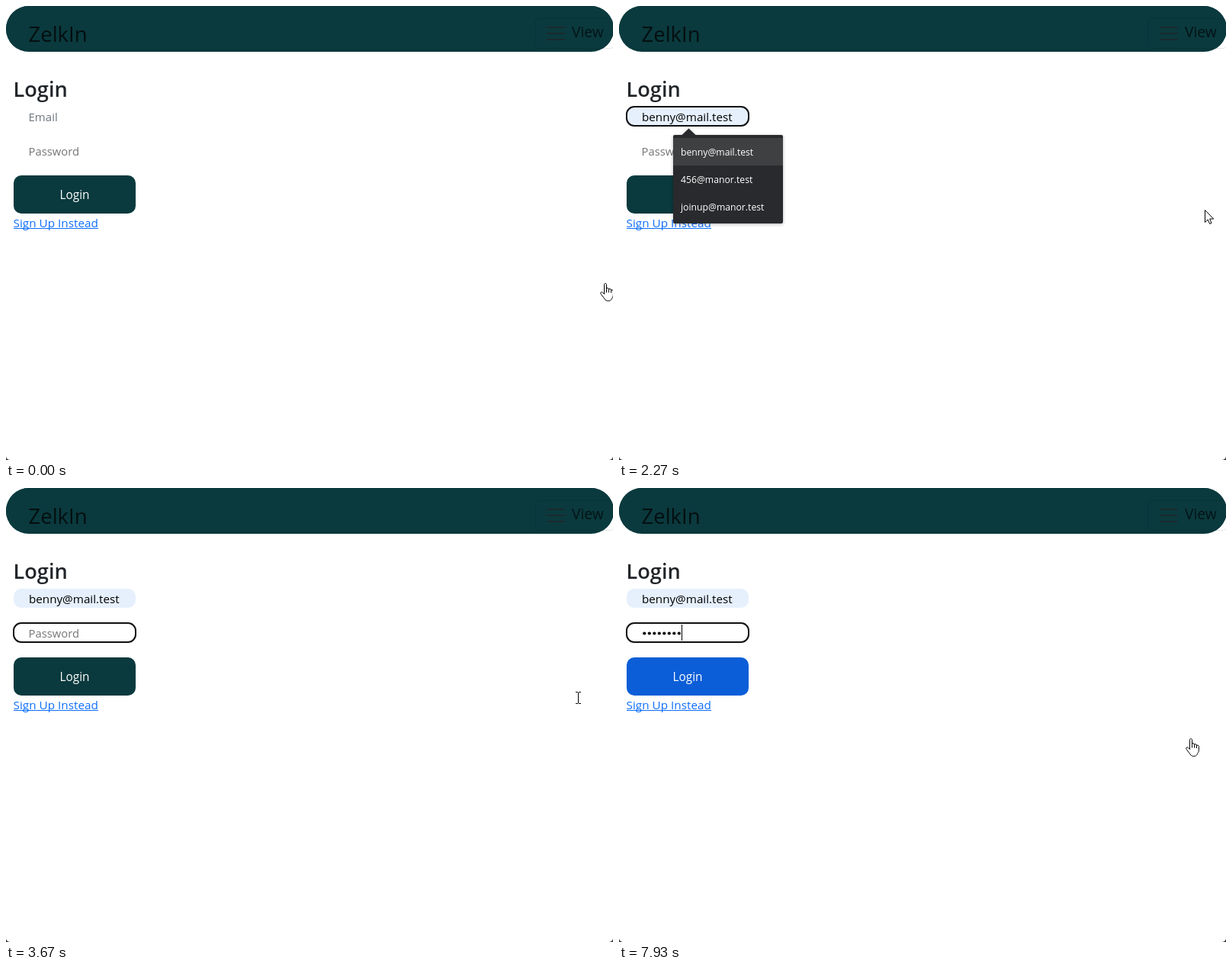
These frames come from a looping animation (796 px wide and 595 px high, 8 s). An HTML page with a canvas:

```html
<!DOCTYPE html>
<html lang="en">
<head>
<meta charset="utf-8">
<title>Login form</title>
<style>
html, body { margin: 0; width: 100%; height: 100%; overflow: hidden; background: #fff; }
canvas { display: block; }
</style>
</head>
<body>
<canvas id="stage" width="796" height="595"></canvas>
<script>
const W = 796, H = 595, LOOP = 8000;
const ctx = document.getElementById('stage').getContext('2d');
const layer = document.createElement('canvas');
layer.width = W;
layer.height = H;
const pop = layer.getContext('2d');

const FONT = '"Open Sans", "Noto Sans", sans-serif';
const TEAL = [10, 58, 62], BLUE = [11, 94, 215];
const MAILS = ['benny@mail.test', '456@manor.test', 'joinup@manor.test'];
const KEYS = [4400, 4530, 4800, 5270, 5530, 5800, 6200, 6670];

// time, shape, x, y
const POINTER = [
  [0, 'hand', 779, 363], [70, 'hand', 762, 314], [130, 'arrow', 744, 251],
  [200, 'arrow', 725, 202], [270, 'arrow', 711, 181], [330, 'arrow', 704, 172],
  [670, 'arrow', 704, 183], [730, 'arrow', 704, 202], [1000, 'arrow', 703, 206],
  [1070, 'beam', 700, 210], [1130, 'beam', 699, 211], [1200, 'beam', 699, 212],
  [2070, 'beam', 707, 220], [2130, 'arrow', 728, 243], [2200, 'arrow', 752, 259],
  [2270, 'arrow', 768, 267], [2330, 'arrow', 773, 269], [2730, 'arrow', 768, 268],
  [2800, 'beam', 755, 267], [2870, 'beam', 747, 267], [7400, 'arrow', 750, 267],
  [7600, 'arrow', 750, 275], [7670, 'hand', 743, 297], [7730, 'hand', 743, 312],
  [7800, 'hand', 743, 322], [7870, 'hand', 743, 326], [7930, 'hand', 743, 328]
];
// time, amount of hover colour on the button
const HOVER = [[0, 0], [70, .4], [130, .25], [200, 0], [7670, .1], [7730, .45], [7800, .85], [7870, 1]];
// time, opacity of the suggestion list
const FADE = [[0, 0], [1400, 1], [2600, .7], [2670, .41], [2730, .22], [2800, .08], [2870, 0]];

const SHAPES = {
  arrow: new Path2D('M.5 .5V16.5L4.2 13L6.6 18.5L9 17.5L6.7 12H11.7Z'),
  hand: new Path2D('M5.5 13V2.2C5.5 0 8.5 0 8.5 2.2V8.5V7.5C8.8 6.2 11.3 6.4 11.5 8V9.5V8.5' +
    'C11.9 7.2 14.2 7.5 14.5 9V10.5V9.8C15 8.6 17.2 9 17.4 10.6V15.5C17.4 18 16 19 15.5 20.5' +
    'C14.5 22.8 13 23.5 10.5 23.5C7.5 23.5 6.3 21.5 5 19.5L1.2 14.5C-.2 12.4 2 11 3.5 12.5L5.5 14.5Z' +
    'M8.5 8.5V12.5M11.5 9.5V12.5M14.5 10.5V13')
};

const at = (list, t) => list.filter(k => k[0] <= t).pop();

function text(c, str, x, y, size, color, weight = 400) {
  c.font = `${weight} ${size}px ${FONT}`;
  c.fillStyle = color;
  c.fillText(str, x, y);
}

function round(c, x, y, w, h, r, fill) {
  c.beginPath();
  c.roundRect(x, y, w, h, r);
  c.fillStyle = fill;
  c.fill();
}

function outline(x, y, w, h, r, color, width) {
  ctx.beginPath();
  ctx.roundRect(x, y, w, h, r);
  ctx.strokeStyle = color;
  ctx.lineWidth = width;
  ctx.stroke();
}

function header() {
  round(ctx, 0, 0, W + 1, 60, 30, 'rgb(9,56,60)');
  ctx.save();
  ctx.clip();
  ctx.fillStyle = `rgb(${TEAL})`;
  ctx.fillRect(0, 0, W, 56);
  ctx.restore();
  outline(693.5, 16.5, 104, 39, 5.5, 'rgba(0,0,0,.1)', 1);
  text(ctx, 'ZelkIn', 29.5, 47, 27.5, '#040f10');
  for (const y of [28, 36, 44]) round(ctx, 709, y - 1, 24, 2, 1, 'rgba(33,37,41,.75)');
  text(ctx, 'View', 742, 41, 19.3, '#031416');
}

function ring(y) {
  outline(10, y, 160, 25, 10, '#101010', 2);
}

function caret(x, y) {
  ctx.fillStyle = '#000';
  ctx.fillRect(x, y, 1, 21);
}

function emailField(t) {
  const filled = t >= 2200;
  if (filled) round(ctx, 10, 132, 160, 25, 10, '#e6f0fd');
  if (t >= 1400 && t < 3070) {
    ring(132);
    if (t < 1930 || (t >= 2470 && t < 2600)) caret(30, 134);
    else if (t >= 2600) caret(149, 134);
  }
  if (filled) text(ctx, MAILS[0], 30, 151, 15.2, '#000');
  else text(ctx, 'Email', 29.5, 151, 15, '#6c757d');
}

function passwordField(t) {
  const count = KEYS.filter(k => k <= t).length;
  if (t >= 3070) ring(177);
  if (!count) text(ctx, 'Password', 29.5, 196, 14.8, '#757575');
  for (let i = 0; i < count; i++) {
    ctx.beginPath();
    ctx.arc(33.3 + 6.5 * i, 190.5, 2.1, 0, 7);
    ctx.fillStyle = '#000';
    ctx.fill();
  }
  const hidden = (t >= 3670 && t < 4200) || (t >= 7200 && t < 7730);
  if (t >= 3070 && !hidden) caret(Math.floor(30 + 6.5 * count), 179);
}

function button(t) {
  const k = at(HOVER, t)[1];
  const mix = TEAL.map((v, i) => Math.round(v + (BLUE[i] - v) * k));
  round(ctx, 10, 222, 160, 50, 10, `rgb(${mix})`);
  ctx.textAlign = 'center';
  text(ctx, 'Login', 90, 253, 15.4, '#fff', 500);
  ctx.textAlign = 'left';
}

function link() {
  text(ctx, 'Sign Up Instead', 9.6, 290, 15.3, '#0d6efd');
  ctx.fillRect(10, 291, 111, 1);
}

function suggestions(t) {
  const alpha = at(FADE, t)[1];
  if (!alpha) return;
  const chosen = t >= 2200;
  pop.clearRect(0, 0, W, H);
  pop.save();
  if (chosen) pop.translate(2, 2);
  pop.shadowColor = 'rgba(0,0,0,.3)';
  pop.shadowBlur = 4;
  pop.shadowOffsetY = 1;
  pop.beginPath();
  pop.roundRect(69, 167, 144, 116, 2);
  pop.moveTo(80, 167.5);
  pop.lineTo(89.5, 158.5);
  pop.lineTo(99, 167.5);
  pop.fillStyle = '#292a2d';
  pop.fill();
  pop.shadowColor = 'transparent';
  if (chosen) {
    pop.fillStyle = 'rgba(255,255,255,.1)';
    pop.fillRect(69, 171, 144, 36);
  }
  MAILS.forEach((m, i) => text(pop, m, 79, 194 + 36 * i, 12.2, '#fff', 500));
  pop.restore();
  ctx.globalAlpha = alpha;
  ctx.drawImage(layer, 0, 0);
  ctx.globalAlpha = 1;
}

function pointer(t) {
  const [, shape, x, y] = at(POINTER, t);
  ctx.save();
  ctx.translate(x, y);
  if (shape === 'beam') {
    ctx.fillStyle = '#000';
    for (const [a, b, w, h] of [[0, 0, 3, 1], [4, 0, 3, 1], [3, 1, 1, 14], [0, 15, 3, 1], [4, 15, 3, 1]])
      ctx.fillRect(a, b, w, h);
  } else {
    ctx.fillStyle = '#fff';
    ctx.strokeStyle = '#000';
    ctx.lineWidth = 1;
    ctx.fill(SHAPES[shape]);
    ctx.stroke(SHAPES[shape]);
  }
  ctx.restore();
}

function corners() {
  ctx.beginPath();
  ctx.rect(0, H - 8, W, 8);
  ctx.roundRect(0, H - 40, W, 40, [0, 0, 5, 5]);
  ctx.save();
  ctx.clip('evenodd');
  ctx.fillStyle = '#333';
  ctx.fillRect(0, H - 8, 8, 8);
  ctx.fillRect(W - 8, H - 8, 8, 8);
  ctx.restore();
}

function draw(t) {
  ctx.fillStyle = '#fff';
  ctx.fillRect(0, 0, W, H);
  header();
  text(ctx, 'Login', 9.5, 119, 27.2, '#212529', 600);
  emailField(t);
  passwordField(t);
  button(t);
  link();
  suggestions(t);
  pointer(t);
  corners();
}

const start = performance.now();
function tick() {
  draw((performance.now() - start) % LOOP);
  requestAnimationFrame(tick);
}
tick();
</script>
</body>
</html>
```
